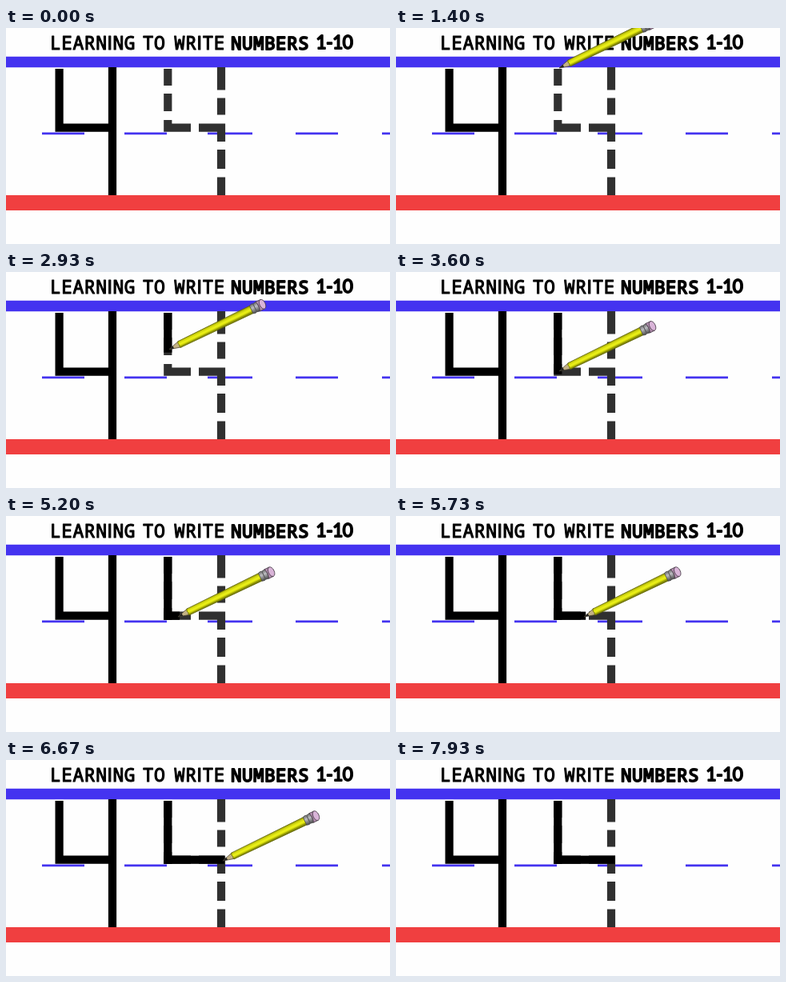
These frames come from a looping animation (480 px wide and 270 px high, 8 s). An HTML page:

```html
<!DOCTYPE html>
<html lang="en">
<head>
<meta charset="utf-8">
<title>Tracing the number four</title>
<style>
  html, body { margin: 0; height: 100%; overflow: hidden; background: #fefefe; }
  svg { display: block; width: 480px; height: 270px; }
  text { font: 23px "Noto Sans Mono", monospace; letter-spacing: .5px; text-anchor: middle;
    stroke: #000; stroke-width: 1.1; stroke-linejoin: round; }
  .heavy { font-size: 22.5px; stroke-width: 1.8; }
  .plain { font-family: Lato, sans-serif; }
  text.plain { letter-spacing: -.4px; }
</style>
</head>
<body>
<svg viewBox="0 0 480 270">
  <defs>
    <linearGradient id="paint" x2="0" y2="1">
      <stop offset="0" stop-color="#8f9208"/>
      <stop offset=".25" stop-color="#d3d80e"/>
      <stop offset=".5" stop-color="#eef31a"/>
      <stop offset=".68" stop-color="#d0d60a"/>
      <stop offset=".75" stop-color="#a0a506"/>
      <stop offset="1" stop-color="#6c7004"/>
    </linearGradient>
    <linearGradient id="metal" x2="0" y2="1">
      <stop offset="0" stop-color="#666"/>
      <stop offset=".4" stop-color="#bdbdc2"/>
      <stop offset="1" stop-color="#444"/>
    </linearGradient>
  </defs>

  <text x="108.5" y="26.6">LEARN<tspan class="plain">I</tspan>NG</text>
  <text x="185" y="26.6">TO</text>
  <text x="242" y="26.6">WR<tspan class="plain">I</tspan>TE</text>
  <text x="330" y="27" class="heavy">NUMBERS</text>
  <text x="410.5" y="26.4" class="heavy plain">1-10</text>

  <path fill="#4433f0" d="M0 35.7H480V49.2H0z"/>
  <path fill="#f03f40" d="M0 209H480V228H0z"/>
  <path stroke="#4433f0" stroke-width="2.8" d="M45 131.8H98M148 131.8H201M252 131.8H308M362 131.8H415M470 131.8H480"/>

  <path fill="none" stroke="#000" stroke-width="10.2" d="M66.6 51V124.7H133M133 49V209"/>
  <path fill="none" stroke="#303030" stroke-width="10.2"
    d="M202.3 51V72M202.3 82V104M202.3 115V124.7H231M241 124.7H274M269 49V77.5M269 87.5V108.5M269 119.5V142M269 152V176M269 186.5V209"/>
  <rect id="down" x="197.2" y="51" width="10.2" height="0"/>
  <rect id="across" x="197.2" y="119.6" width="0" height="10.2"/>

  <g id="pencil" visibility="hidden">
    <g transform="rotate(-25.8)">
      <path fill="#c3b285" stroke="#4d4630" stroke-width=".7" d="M0 0L15-4.2V4.2z"/>
      <path fill="#222" d="M0 0L6-1.8V1.8z"/>
      <path fill="url(#paint)" stroke="#5c6004" stroke-width=".7" d="M14-4.2L115-5.2V5.2L14 4.2Q12 2 14 1Q12-1 14-4.2z"/>
      <path fill="url(#metal)" stroke="#444" stroke-width=".7" d="M114-5.4L117-6.2L119-5.6L124-6.4V6.4L119 5.6L117 6.2L114 5.4z"/>
      <path stroke="#555" d="M119-5.5V5.5"/>
      <path fill="#b48fb0" stroke="#4a3d49" stroke-width=".8" d="M123-6.3H129.5V6.3H123Q125.5 0 123-6.3z"/>
      <ellipse cx="129.5" rx="3.6" ry="6.3" fill="#d9b4d8" stroke="#4a3d49" stroke-width=".8"/>
    </g>
  </g>
</svg>
<script>
  const LOOP = 8000, APPEAR = 1200, VANISH = 6730;
  const [down, across, pencil] = ['down', 'across', 'pencil'].map(id => document.getElementById(id));

  // Linear move from a to b between two times, held outside them.
  const move = (t, start, end, a, b) =>
    a + (b - a) * Math.min(1, Math.max(0, (t - start) / (end - start)));

  function draw() {
    const t = performance.now() % LOOP;
    const x = move(t, 4910, 6700, 204, 272);
    const y = move(t, 1780, 3656, 50, 126);
    pencil.setAttribute('transform', `translate(${x} ${y})`);
    pencil.setAttribute('visibility', t >= APPEAR && t < VANISH ? 'visible' : 'hidden');
    down.setAttribute('height', t > 1780 ? y + 4 - 51 : 0);
    across.setAttribute('width', t > 4910 ? x + 2 - 197.2 : 0);
    requestAnimationFrame(draw);
  }
  draw();
</script>
</body>
</html>
```
